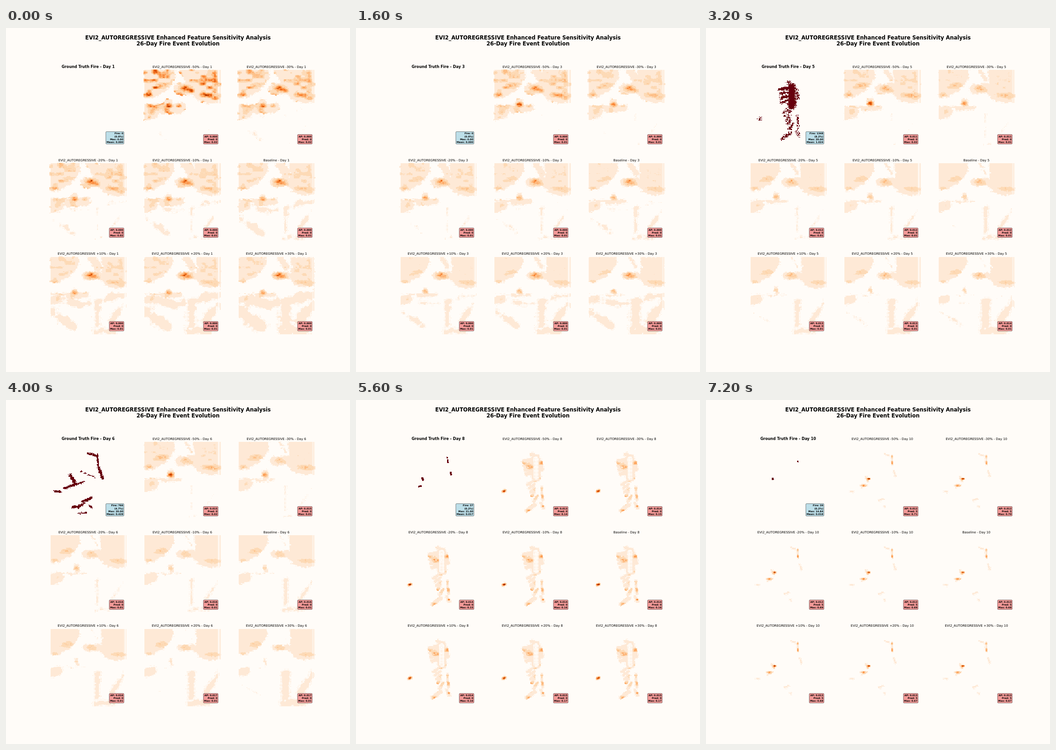
These frames come from a looping animation (748 by 748 pixels, 8000 ms). An HTML page with a canvas:

```html
<!DOCTYPE html>
<html lang="en">
<head>
<meta charset="utf-8">
<title>Fire sensitivity maps</title>
<style>
html, body { margin: 0; width: 100%; height: 100%; overflow: hidden; background: #fffcf8; }
canvas { display: block; width: 748px; height: 748px; }
</style>
</head>
<body>
<canvas id="stage" width="748" height="748"></canvas>
<script>
const ctx = document.getElementById('stage').getContext('2d');
const DAY_MS = 800, DAY_COUNT = 10;
const N = 128, SIZE = 169.3, CELL = SIZE / N;
const FONT = '"DejaVu Sans", sans-serif';
const VARIANTS = ['-50%', '-30%', '-20%', '-10%', 'Baseline', '+10%', '+20%', '+30%'];
const ORANGES = ['#fee9d6', '#fddab6', '#fdc48f', '#fda965', '#fd8c3b', '#f06712', '#d84801', '#a33503', '#7f2704'];
const MAROON = '#67000d';

// Scores are polynomials in the variant index: [constant, linear, quadratic].
const STATS = {
  1: { peak: [2.5, -.2] },
  2: { peak: [2.2, -.15] },
  5: { burn: ['1348', '8.2', '20.00', '1.024'], ap: [11.2, .42], peak: [2, -.14] },
  6: { burn: ['766', '4.7', '20.00', '0.428'], ap: [15.5, .25], peak: [2, -.14] },
  7: { burn: ['195', '1.2', '21.00', '0.109'], ap: [14.7, .335], peak: [5.02, -.3, .06] },
  8: { burn: ['37', '0.2', '21.00', '0.017'], ap: [13.85, .2], peak: [14.7, .44] },
  9: { burn: ['33', '0.2', '18.20', '0.016'], ap: [13.2, .2], peak: [40, .5] },
  10: { burn: ['39', '0.2', '14.84', '0.018'], ap: [12.05, .25], peak: [71.1, -.65, .01] }
};

// Panel pixels; strokes are [x1, y1, x2, y2, radius].
const NORTH = [
  [-2, -2, 66, -2, 66, 18, 55, 35, 42, 47, 18, 59, -1, 59],
  [110, -2, 172, -2, 172, 68, 142, 71, 122, 65, 109, 50, 115, 24]
];
const SOUTH = [[104, 100, 104, 150, 8], [164, 98, 136, 140, 6], [150, 158, 100, 164, 7]];
const BLOCK = [
  [92, 38, 93, 78, 9], [84, 28, 97, 35, 3], [103, 44, 106, 62, 2.5], [105, 101, 107, 128, 1.6],
  [88, 130, 95, 119, 2.2], [72, 151, 90, 138, 3], [103, 135, 109, 145, 2], [21, 109, 25, 107, 2.4]
];
for (let i = 0; i < 4; i++) {
  BLOCK.push([66 + i * 2, 44 + i * 9, 86, 40 + i * 9, 3.5]);
  BLOCK.push([75 + i * 3, 94 + i * 8, 89, 85 + i * 8, 2.2]);
}

// Fire fronts that contract daily: [x, y, reach x, reach y, radius, last day].
const FRONTS = [
  [94, 29, 10, 3, 2.4, 7], [104, 35, 2, 3, 2.2, 8], [106, 44, 1, 14, 2.3, 10], [112, 70, 4, 11, 3, 8],
  [51, 82, 5, 9, 3.6, 10], [45, 98, 11, -4, 2.8, 8], [67, 91, 8, -3, 2.2, 6], [18, 109, 6, 1, 2.5, 7],
  [82, 127, 9, -4, 2.8, 7], [70, 139, 6, -5, 2.6, 6], [59, 142, 8, -1, 3, 6], [90, 142, 2, 2, 2.4, 7],
  [72, 156, 8, 0, 1.7, 6], [84, 72, 15, 6, 1.2, 6]
];

const hash = (x, y) => {
  const h = Math.sin(x * 127.1 + y * 311.7) * 43758.5453;
  return h - Math.floor(h);
};
const mix = (a, b, t) => a + (b - a) * t;

function noise(x, y) {
  const ix = Math.floor(x), iy = Math.floor(y);
  const smooth = t => t * t * (3 - 2 * t);
  const u = smooth(x - ix), v = smooth(y - iy);
  return mix(mix(hash(ix, iy), hash(ix + 1, iy), u), mix(hash(ix, iy + 1), hash(ix + 1, iy + 1), u), v);
}

function distance(x, y, x1, y1, x2, y2) {
  const dx = x2 - x1, dy = y2 - y1;
  const t = Math.max(0, Math.min(1, ((x - x1) * dx + (y - y1) * dy) / (dx * dx + dy * dy || 1)));
  return Math.hypot(x - x1 - dx * t, y - y1 - dy * t);
}

// Depths are positive inside a shape and negative outside.
const deepest = (shapes, depth) => shapes.reduce((best, s) => Math.max(best, depth(s)), -99);
const strokesDepth = (strokes, x, y) => deepest(strokes, s => s[4] - distance(x, y, ...s));

function polygonDepth(points, x, y) {
  let nearest = 1e3, inside = false;
  for (let i = 0, j = points.length - 2; i < points.length; j = i, i += 2) {
    const x1 = points[j], y1 = points[j + 1], x2 = points[i], y2 = points[i + 1];
    nearest = Math.min(nearest, distance(x, y, x1, y1, x2, y2));
    if ((y1 > y) !== (y2 > y) && x < x1 + (y - y1) / (y2 - y1) * (x2 - x1)) inside = !inside;
  }
  return inside ? nearest : -nearest;
}

function burnStrokes(day) {
  if (day < 5) return [];
  if (day === 5) return BLOCK;
  const reach = .45 ** (day - 6);
  return FRONTS.filter(f => f[5] >= day).map(([x, y, dx, dy, r]) =>
    [x - dx * reach, y - dy * reach, x + dx * reach, y + dy * reach, r * Math.max(.65, reach)]);
}

function grid(fn) {
  return Float32Array.from({ length: N * N }, (_, i) => fn((i % N + .5) * CELL, (Math.floor(i / N) + .5) * CELL));
}
const fine = grid((x, y) => noise(x / 4, y / 3));
const coarse = grid((x, y) => .6 * noise(x / 17 + 9, y / 14 + 4) + .4 * noise(x / 8 + 3, y / 7));
const blotches = grid((x, y) => noise(x / 13 + 31, y / 8 + 17));

// Spots are [x, y, rx, ry, strength, share kept by the last variant].
function slowBurn(day) {
  const age = day - 1, s = age / 5;
  const midX = 55 + age, midY = 79 - age * 1.2;
  const strokes = [
    [80, 43, 108, 41, 10 - age * .5], [92, 2, 106, 24, 10 - age * 2], [42, 86, 80, 84, 8 - age * 1.5],
    [midX - 1, midY - 4, midX + 2, midY + 4, 7 - age * .5], [4, 96, 20, 93, 11], [4, 83, 40, 83, 4 - age]
  ];
  const south = [...SOUTH, [8, 122, 50, 145, 12 - age * 3], [25, 98, 85, 102, 8 - age * 3], [130, 92, 168, 84, 7 - age * 3]];
  return {
    land: grid((x, y) => Math.max(deepest(NORTH, p => polygonDepth(p, x, y)), strokesDepth(strokes, x, y))),
    south: grid((x, y) => Math.min(9, strokesDepth(south, x, y)) + mix(3, 0, s)),
    grow: mix(1.1, .7, s), step: mix(2.8, 1.5, s), rough: mix(24, 9, s), texture: 1.1 * .65 ** age,
    spots: [
      [92, 42, 8 - s, 4.5, mix(.6, .18, s), .8], [91, 39, 3, 2.5, mix(.2, .05, s), .8],
      [midX, midY, 4.5, 3.2, .75, mix(.5, .05, s)], [40, 35, 9, 4.5, .28, mix(.2, .6, s)],
      [152, 57, 11, 3.5, .28, .45], [13, 56, 5, 3, .2, .5], [18, 93, 5, 4, mix(.25, .1, s), .3]
    ]
  };
}

function collapse() {
  const strokes = [[48, 14, 78, 22, 10], [50, 20, 62, 30, 9], [12, 42, 44, 36, 4], [60, 86, 80, 85, 5], [7, 97, 18, 93, 2.5], [134, 58, 150, 56, 2]];
  return {
    land: grid((x, y) => strokesDepth(strokes, x, y)), grow: .7, texture: .2,
    spots: [[74, 49, 7, 7, .3, 1], [66, 43, 2, 2, .35, .7], [72, 56, 2, 2, .4, 1.3], [99, 45, 5, 3, .3, 1.7], [148, 32, 8, 7, .06, 1]]
  };
}

// Later forecasts follow what burned three days before.
function echo(day) {
  const strokes = burnStrokes(day - 3);
  const hot = {
    8: [[22, 109, 2.2, 1.7, .6, 1], [25, 107, 2.2, 1.7, .65, 1], [108, 141, 1.5, 1.4, .45, 1]],
    9: [[53, 85, 3, 3, .4, 1], [18, 109, 3, 2, .35, 1]],
    10: [[55, 82, 2, 1.5, .9, 1], [44, 96, 4.5, 1.7, .35, 1], [106, 33, 1.2, 1.8, .4, 1]]
  };
  return {
    land: grid((x, y) => {
      const depth = strokesDepth(strokes, x, y);
      return depth > 3.5 ? -1.5 : depth + 1 - (day - 8) * .6;
    }),
    grow: 0, texture: .7, spots: hot[day]
  };
}

const scene = day => day < 7 ? slowBurn(day) : day === 7 ? collapse() : echo(day);

function raster(colorAt) {
  const map = document.createElement('canvas');
  map.width = map.height = N;
  const c = map.getContext('2d');
  for (let i = 0; i < N * N; i++) {
    const col = i % N, row = Math.floor(i / N);
    const color = colorAt((col + .5) * CELL, (row + .5) * CELL, i, col, row);
    if (!color) continue;
    c.fillStyle = color;
    c.fillRect(col, row, 1, 1);
  }
  return map;
}

function heatMap({ land, south, step, rough, grow, texture, spots }, k) {
  const fade = 1 - Math.exp(-k / 1.6);
  return raster((x, y, i, col, row) => {
    const dot = col % 2 && row % 2;
    const grain = fine[i] - .5;
    const edge = land[i] + grain * (grow ? 5 : 2) + (3.5 - k) * grow;
    const low = south ? south[i] + (coarse[i] - .5) * rough + grain * 4 - (7 - k) * step : -99;
    const margin = x < 2 || y < 1 || x > 163 && col % 2;
    let v = !margin && (edge > 0 || low > 0 || dot && (edge > -2 || low > -4)) ? .06 : 0;
    let heat = edge > 0 ? Math.max(0, blotches[i] - .5) * texture * mix(1, grow ? .15 : 1, fade) : 0;
    for (const [sx, sy, rx, ry, strength, keep] of spots) {
      const d = ((x - sx) / rx) ** 2 + ((y - sy) / ry) ** 2;
      if (d < 9) heat += strength * mix(1, keep, fade) * Math.exp(-d / 2);
    }
    v += heat * (dot ? 1.2 : .85) * (1 + grain);
    return v > .05 && ORANGES[Math.min(8, Math.floor(v * 9))];
  });
}

function burnMap(day) {
  const strokes = burnStrokes(day);
  const ragged = day === 5 ? 6 : day === 6 ? 3 : 1;
  return raster((x, y, i, col, row) => {
    const speck = hash(col >> 1, row);
    return strokesDepth(strokes, x, y) + (speck - .55) * ragged > 0 && MAROON;
  });
}

function label(text, x, y, size, weight = 'normal', align = 'center') {
  ctx.font = `${weight} ${size}px ${FONT}`;
  ctx.textAlign = align;
  ctx.fillStyle = '#000';
  ctx.fillText(text, x, y);
}

function statBox(lines, px, py, fill) {
  const size = 5.19, pitch = 6.12, pad = 1.6;
  const right = px + SIZE * .95, bottom = py + SIZE * .95;
  ctx.font = `bold ${size}px ${FONT}`;
  const width = Math.max(...lines.map(line => ctx.measureText(line).width)) + pad * 2;
  const height = lines.length * pitch + pad * 1.5;
  ctx.beginPath();
  ctx.roundRect(right + pad - width, bottom + pad - height, width, height, 1.6);
  ctx.fillStyle = fill;
  ctx.fill();
  ctx.strokeStyle = 'rgba(0,0,0,.8)';
  ctx.lineWidth = .6;
  ctx.stroke();
  lines.forEach((line, i) => label(line, right, bottom - .8 - (lines.length - 1 - i) * pitch, size, 'bold', 'right'));
}

function buildMaps(day) {
  const fields = scene(day);
  return [burnMap(day), ...VARIANTS.map((_, k) => heatMap(fields, k))];
}

function draw(day, maps) {
  const { burn = ['0', '0.0', '0.00', '0.000'], ap = [0, 0], peak = [1, 0] } = STATS[day] || {};
  const score = ([a, b, c = 0], k) => Math.floor(a + b * k + c * k * k);
  ctx.fillStyle = '#fffcf8';
  ctx.fillRect(0, 0, 748, 748);
  ctx.imageSmoothingEnabled = false;
  label('EVI2_AUTOREGRESSIVE Enhanced Feature Sensitivity Analysis', 374, 24.6, 11.54, 'bold');
  label('26-Day Fire Event Evolution', 374, 38, 11.54, 'bold');
  maps.forEach((map, i) => {
    const px = 94 + (i % 3) * 204.7, py = 89.8 + Math.floor(i / 3) * 203.3;
    const middle = px + SIZE / 2, titleY = py - 3;
    ctx.drawImage(map, px, py, SIZE, SIZE);
    if (!i) {
      const [fire, share, max, mean] = burn;
      label(`Ground Truth Fire - Day ${day}`, middle, titleY, 8.08, 'bold');
      statBox([`Fire: ${fire}`, `(${share}%)`, `Max: ${max}`, `Mean: ${mean}`], px, py, '#bddfe9');
      return;
    }
    const k = i - 1, name = VARIANTS[k];
    label(`${name === 'Baseline' ? name : 'EVI2_AUTOREGRESSIVE ' + name} - Day ${day}`, middle, titleY, 6.93);
    statBox([
      `AP: ${(score(ap, k) / 1000).toFixed(3)}`,
      `Pred: ${day === 10 ? 5 : 0}`,
      `Max: ${(score(peak, k) / 100).toFixed(2)}`
    ], px, py, '#f29997');
  });
}

const allMaps = Array.from({ length: DAY_COUNT }, (_, i) => buildMaps(i + 1));
const start = performance.now();
let shown = 0;
function tick() {
  const day = 1 + Math.floor((performance.now() - start) / DAY_MS) % DAY_COUNT;
  if (day !== shown) draw(shown = day, allMaps[day - 1]);
  requestAnimationFrame(tick);
}
tick();
</script>
</body>
</html>
```
